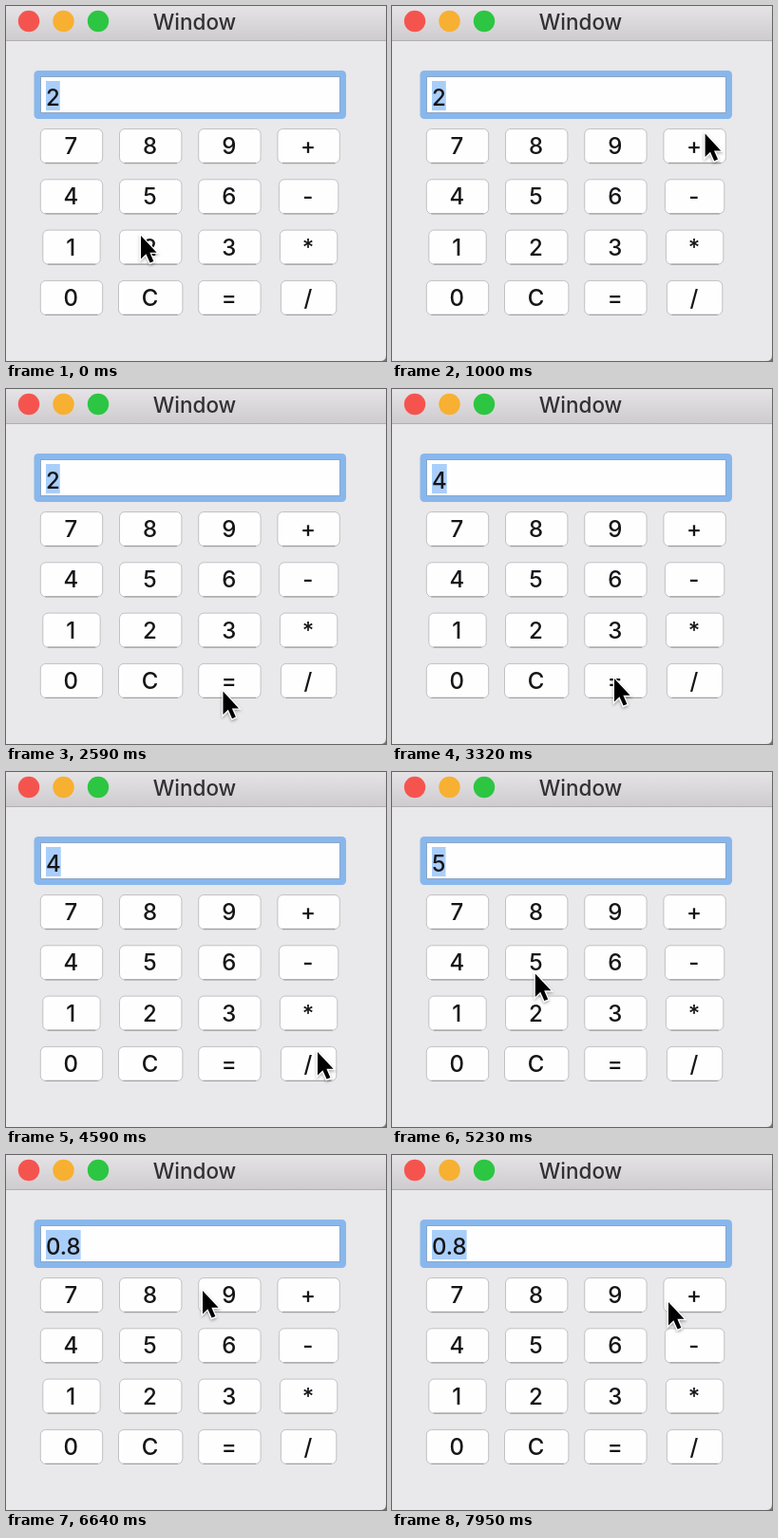
These frames come from a looping animation (400x374 px, 8 s). An HTML page:

```html
<!DOCTYPE html>
<html lang="en">
<head>
<meta charset="utf-8">
<title>Calculator</title>
<style>
  html, body { margin: 0; width: 100%; height: 100%; overflow: hidden; background: #e9e8ea; }
  svg { display: block; width: 400px; height: 374px; }
  text { font: 500 24px Inter, "Open Sans", sans-serif; fill: #151517; }
  .mid { text-anchor: middle; }
  .title { font-size: 22.5px; fill: #333034; }
  .key { fill: #fefefe; stroke: #c1c0c3; }
  .edge { stroke: #a3a2a5; stroke-width: 1.3; }
</style>
</head>
<body>
<svg viewBox="0 0 400 374">
  <defs>
    <linearGradient id="bar" x2="0" y2="1">
      <stop offset="0" stop-color="#e6e3e7"/>
      <stop offset="1" stop-color="#cfccd0"/>
    </linearGradient>
    <filter id="shade" x="-50%" y="-50%" width="200%" height="200%">
      <feDropShadow dx="0" dy="1.5" stdDeviation="1.4" flood-opacity=".35"/>
    </filter>
  </defs>
  <rect width="400" height="374" fill="#e9e8ea"/>
  <rect width="400" height="36" fill="url(#bar)"/>
  <rect y="36" width="400" height="1" fill="#b1aeb2"/>
  <path d="M400 368V374H394Q400 374 400 368Z" fill="#777"/>
  <g id="lights"></g>
  <text class="mid title" x="198.5" y="25">Window</text>

  <rect x="29.5" y="68" width="328.5" height="51" rx="4.5" fill="#88b7ed"/>
  <rect x="36.5" y="74.5" width="315" height="38" fill="#fefefe" stroke="#8ca6c6"/>
  <rect id="selection" x="42" y="79" height="31" fill="#a9cefa"/>
  <text id="value" x="42" y="105"></text>

  <g id="keys"></g>
  <g id="pointer" filter="url(#shade)">
    <path d="M1 2V26.5L6.4 21.2L10.6 30.6L14.4 29L10.4 19.8H17.6Z"
          fill="#050505" stroke="#fff" stroke-width="2.4" paint-order="stroke"/>
  </g>
</svg>
<script>
const LOOP = 8000;
const STEP = 1000 / 22;
const $ = id => document.getElementById(id);

$("lights").innerHTML = ["#f5544e", "#f7b031", "#2cc642"].map((color, i) =>
  `<circle cx="${24 + i * 36.5}" cy="16" r="11.2" fill="${color}"/>`).join("");

// Keys share one grid; a few labels change the natural width.
const extraWidth = { "1": -5, "*": -5, "/": -7, "-": -3, "C": 2 };
$("keys").innerHTML = [..."789+456-123*0C=/"].map((label, i) => {
  const x = 69 + i % 4 * 83.2;
  const top = 129.5 + Math.floor(i / 4) * 53.3;
  const half = (65.4 + (extraWidth[label] || 0)) / 2;
  return `
    <rect class="key" x="${x - half}" y="${top}" width="${half * 2}" height="36" rx="5.5"/>
    <path class="edge" d="M${x - half + 5} ${top + 36}h${half * 2 - 10}"/>
    <text class="mid" x="${x - 0.7}" y="${top + 26.5}">${label}</text>`;
}).join("");

const values = [[0, "2"], [2820, "4"], [5180, "5"], [6090, "0.8"]];

// Turning points of the pointer tip: time, x, y
const path = [
  [0, 141, 240], [640, 328, 108], [1100, 312, 150], [1550, 149, 270],
  [1780, 190, 205], [1910, 277, 310], [2200, 241, 318], [3320, 233, 303],
  [4150, 376, 238], [4590, 327, 293], [5050, 150, 201], [5860, 231, 296],
  [6300, 238, 312], [6640, 206, 141], [7080, 376, 210], [7460, 155, 252],
  [7820, 322, 114], [7950, 290, 153]
];

function slope(i, axis) {
  const a = path[i - 1], b = path[i + 1];
  return a && b ? (b[axis] - a[axis]) / (b[0] - a[0]) : 0;
}

// Cubic curve through the turning points
function pointerAt(t, axis) {
  const next = path.findIndex(p => p[0] > t);
  if (next < 0) return path[path.length - 1][axis];
  const i = next - 1, a = path[i], b = path[next];
  const span = b[0] - a[0], u = (t - a[0]) / span;
  const ease = u * u * (3 - 2 * u);
  return a[axis] * (1 - ease) + b[axis] * ease
    + span * u * (1 - u) * ((1 - u) * slope(i, axis) - u * slope(next, axis));
}

function draw(elapsed) {
  const step = Math.floor((elapsed % LOOP + 5) / STEP);
  const t = Math.round(step * STEP / 10) * 10 % LOOP;
  const text = values.filter(v => v[0] <= t).pop()[1];
  if ($("value").textContent !== text) {
    $("value").textContent = text;
    $("selection").setAttribute("width", $("value").getComputedTextLength());
  }
  const x = pointerAt(t, 1), y = pointerAt(t, 2);
  $("pointer").setAttribute("transform", `translate(${x.toFixed(2)} ${y.toFixed(2)})`);
}

const start = performance.now();
function tick() {
  draw(performance.now() - start);
  requestAnimationFrame(tick);
}
tick();
</script>
</body>
</html>
```
